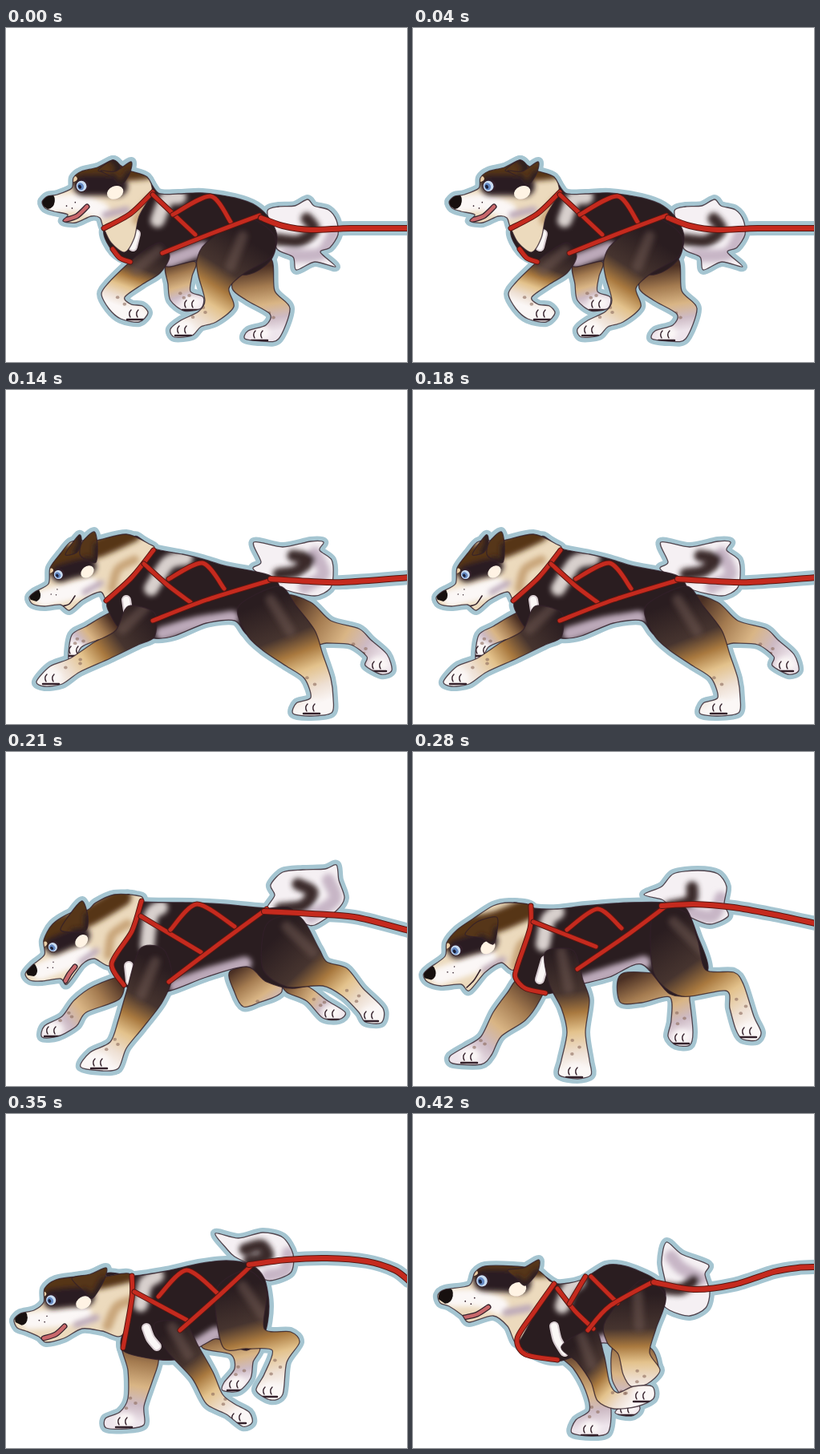
Write an HTML page that moves like this. It is 500x417 px and loops after 490 ms.

```html
<!DOCTYPE html>
<html lang="en">
<head>
<meta charset="utf-8">
<title>Running sled dog</title>
<style>
  html, body { margin: 0; width: 100%; height: 100%; overflow: hidden; background: #fff; }
  #stage { width: 500px; height: 417px; overflow: hidden; }
  #strip { animation: run 490ms steps(7) infinite; will-change: transform; }
  #strip svg { display: block; width: 500px; height: 417px; overflow: hidden; }
  path { stroke-linecap: round; stroke-linejoin: round; }
  @keyframes run { to { transform: translateY(-100%); } }
</style>
</head>
<body>
<div id="stage"><div id="strip"></div></div>
<script>
const INK = '#33202a', DARK = '#2a1d20', BROWN = '#563619', CREAM = '#ecdabd',
      LILAC = '#bca9b9', WHITE = '#fbf7f6', HALO = '#a5c5d1', RED = '#c52a1e';
let ids = 0;

const points = s => s.split(' ').map(p => p.split(',').map(Number));

// Softly rounded curve through the points
function curve(s, closed) {
  const p = points(s), n = p.length;
  const at = i => closed ? p[(i + n) % n] : p[Math.max(0, Math.min(n - 1, i))];
  let d = 'M' + p[0];
  for (let i = 0; i < (closed ? n : n - 1); i++) {
    const [a, b, c, e] = [at(i - 1), at(i), at(i + 1), at(i + 2)];
    const h = k => b[k] + (c[k] - a[k]) / 7, g = k => c[k] - (e[k] - b[k]) / 7;
    d += `C${h(0)} ${h(1)} ${g(0)} ${g(1)} ${c}`;
  }
  return closed ? d + 'Z' : d;
}

const line = (s, color, w) =>
  `<path d="${curve(s)}" fill="none" stroke="${color}" stroke-width="${w}"/>`;
const oval = (x, y, rx, ry, color) =>
  `<ellipse cx="${x}" cy="${y}" rx="${rx}" ry="${ry}" fill="${color}"/>`;
const blur = inner => `<g filter="url(#soft)">${inner}</g>`;
const strap = (s, w = 7) => line(s, '#571712', w) + line(s, RED, w - 2);

// Filled outline with shading clipped inside it
function part(s, fill, inner = '') {
  const d = curve(s, true), id = 'c' + ids++;
  return `<clipPath id="${id}"><path d="${d}"/></clipPath><path d="${d}" fill="${fill}"/>
    <g clip-path="url(#${id})">${inner}</g>
    <path d="${d}" fill="none" stroke="${INK}" stroke-width="1.3" stroke-opacity=".8"/>`;
}

// The axis runs hip, knee, paw
function leg([shape, axis], near) {
  const [hip, knee, paw] = points(axis), id = 'g' + ids++;
  const [x, y] = paw;
  const tones = near
    ? [[0, DARK], [.34, '#46342f'], [.52, '#a9793f'], [.68, '#e3c28c'], [.86, '#eee0d4'], [1, WHITE]]
    : [[0, '#4b3024'], [.3, '#a47b50'], [.58, '#d9b585'], [.8, '#cdbac4'], [1, '#eee5ec']];
  const stops = tones.map(([o, c]) => `<stop offset="${o}" stop-color="${c}"/>`).join('');
  const spots = [.35, .5, .65].map((t, i) => oval(
    knee[0] + (x - knee[0]) * t + (i % 2 ? 5 : -4),
    knee[1] + (y - knee[1]) * t, 2.3, 2, '#8d6c5c99')).join('');
  const mid = [(hip[0] + knee[0]) / 2, (hip[1] + knee[1]) / 2];
  const sheen = near ? blur(line(`${hip} ${mid}`, '#6f574f88', 13)) : '';
  const toes = `<path d="M${x - 6} ${y - 3}q-4 4-1 9M${x + 3} ${y - 3}q-4 4-1 9"
    fill="none" stroke="${INK}" stroke-width="1.4"/>`;
  return `<linearGradient id="${id}" gradientUnits="userSpaceOnUse" x1="${hip[0]}" y1="${hip[1]}"
    x2="${x}" y2="${y}">${stops}</linearGradient>` +
    part(shape, `url(#${id})`, sheen + blur(oval(x, y, 12, 9, WHITE)) + spots + toes +
      line(`${x - 11},${y + 9} ${x + 9},${y + 9}`, INK, 2.5));
}

// Face details, in units where the nose is at 0,0 and the eye at 50,0
function head(p) {
  const [[nx, ny], [ex, ey]] = points(p.face);
  const a = (ex - nx) / 50, b = (ey - ny) / 50;
  const place = s => `<g transform="matrix(${a} ${b} ${-b} ${a} ${nx} ${ny})">${s}</g>`;
  const coat = blur(place(
    line('95,62 118,46 145,50', '#c9a67a', 12) + line('62,42 88,46', LILAC, 8) +
    line('46,-19 72,-16 112,4 165,18', BROWN, 27) +
    line('52,0 72,8 88,16', DARK, 25)));
  const marks = place(
    oval(83, 22, 10, 7.5, '#fff3e4') + oval(44, -11, 4, 3, '#e9cda6') +
    oval(50, 0, 8, 7.5, INK) + oval(49, 0, 6, 6.3, '#c9dcf2') +
    oval(48, 0, 3.7, 4.5, '#6488c2') + oval(47, 0, 1.8, 2.4, '#1b2038') +
    [24, 29, 35].map((x, i) => oval(x, 15 + i % 2 * 5, .8, .8, INK)).join('') +
    `<path d="M-3 3Q-1-7 11-6Q17-3 13 5Q9 12 2 10Z" fill="#17100f"/>`);
  const mouth = p.open
    ? line(p.mouth, INK, 7) + line(p.mouth, '#c9686b', 4.5)
    : line(p.mouth, INK, 1.6);
  return part(p.head, CREAM, blur(line(p.muzzle, WHITE, 22)) + coat + marks + mouth) +
    p.ears.map(e => part(e, BROWN, blur(line(e.split(' ').slice(-3).join(' '), DARK, 9)))).join('');
}

function dog(p) {
  const shapes = [p.tail, p.body, p.head, ...p.ears, ...p.far.map(l => l[0]), ...p.near.map(l => l[0])];
  const halo = shapes.map(s =>
    `<path d="${curve(s, true)}" fill="${HALO}" stroke="${HALO}" stroke-width="12"/>`).join('');
  const coat = blur(line(p.streak, '#d8d0cd', 18) + line(p.belly, LILAC, 17)) +
    line(p.chest, '#d9cdd2', 12) + line(p.chest, WHITE, 8);
  return '<svg viewBox="0 0 500 417">' + halo + line(p.tug, HALO, 18) +
    part(p.tail, '#f5f0f3', blur(line(p.shade, '#c7b6c6', 16) + line(p.ring, '#3a292b', 15))) +
    p.far.map(l => leg(l, false)).join('') + part(p.body, DARK, coat) +
    p.near.map(l => leg(l, true)).join('') + head(p) +
    p.straps.map(s => strap(s)).join('') + strap(p.tug, 8) + '</svg>';
}

const poses = [
  {
    face: '46,217 95,197', open: 1, mouth: '72,240 88,235 101,223', muzzle: '58,220 90,218 118,228',
    head: '45,217 52,210 64,208 82,200 84,187 94,179 114,174 133,165 142,171 154,178 176,186 182,205 166,235 160,262 148,280 131,268 121,248 117,237 106,235 87,243 71,241 77,233 60,229 49,225',
    ears: ['115,178 133,165 142,172 138,180', '118,178 136,179 156,167 154,182 143,196 132,186'],
    body: '172,186 190,206 215,207 245,206 285,212 312,222 330,240 338,262 330,290 300,308 250,300 236,291 205,298 190,296 158,293 134,280 122,252 150,225',
    streak: '216,211 200,214 189,240', chest: '162,257 158,273', belly: '203,291 245,275',
    tail: '326,228 340,223 360,222 376,214 384,222 402,227 412,240 414,258 404,274 392,280 411,298 385,292 362,302 358,286 338,276 330,250',
    shade: '350,284 392,282 409,256', ring: '338,264 365,266 384,252 375,238',
    far: [['290,300 282,325 300,340 329,357 324,371 302,378 298,388 320,391 340,388 354,350 335,328 330,288', '305,300 340,342 317,381'],
          ['200,295 202,320 205,340 222,353 243,350 246,336 230,329 232,310 236,292', '215,290 216,325 231,343']],
    near: [['250,268 300,238 334,258 331,285 296,307 278,325 284,348 262,367 243,373 232,384 210,386 205,376 218,365 240,354 248,340 240,310 238,290', '295,260 265,335 222,375'],
           ['166,282 148,298 128,318 119,332 128,350 143,363 166,367 177,356 170,347 156,345 148,336 170,320 192,306 204,285 192,268', '190,278 133,326 162,355']],
    straps: ['183,205 155,232 122,250', '183,208 236,258', '208,233 255,210 280,242', '195,281 255,257 316,234', '133,276 142,287 155,292'],
    tug: '318,237 345,247 380,252 430,250 502,250'
  },
  {
    face: '40,237 81,211', open: 1, mouth: '73,256 87,250 97,238', muzzle: '54,240 82,236 110,239',
    head: '38,238 45,231 62,225 70,214 68,200 78,181 95,171 110,176 132,180 160,183 172,195 184,206 155,235 127,259 118,246 105,246 93,256 73,257 75,250 55,249 42,246',
    ears: ['76,187 92,172 109,173 100,184', '95,182 118,178 135,164 137,175 130,192 118,192'],
    body: '160,184 183,205 205,210 230,221 270,225 318,240 335,262 338,290 325,310 290,325 268,300 255,297 210,298 180,292 150,292 132,277 127,258 150,232',
    streak: '208,214 194,220 180,245', chest: '157,257 149,267', belly: '185,297 258,290',
    tail: '316,238 327,230 311,211 345,218 375,213 397,219 391,226 404,244 400,260 405,272 375,274 400,283 360,278 340,268 328,252',
    shade: '345,266 382,270 401,252', ring: '338,244 362,252 379,240 366,230',
    far: [['332,272 352,280 372,302 390,318 408,340 422,362 418,385 405,398 384,397 380,389 400,374 385,349 360,338 332,328', '335,285 396,340 397,386'],
          ['150,296 148,325 142,345 160,352 185,356 201,349 192,340 169,338 172,320 178,298', '163,292 158,338 184,345']],
    near: [['275,250 318,240 335,262 335,300 322,325 341,350 335,375 315,400 290,410 265,408 271,395 298,388 310,370 306,352 280,330 268,305', '312,258 322,355 288,398'],
           ['155,276 120,290 98,297 87,308 89,328 80,344 86,354 104,356 110,342 106,322 114,313 150,304 176,300 182,280', '176,280 99,304 96,346']],
    straps: ['184,207 158,236 125,260', '185,210 203,241 222,268', '205,234 246,224 262,252', '177,289 230,266 318,240'],
    tug: '315,240 360,247 410,252 455,248 502,240'
  },
  {
    face: '31,258 66,230', open: 0, mouth: '70,270 79,267 86,257', muzzle: '48,260 75,253 105,245',
    head: '29,259 36,252 53,242 55,222 68,204 80,190 93,188 112,188 150,180 178,192 184,200 155,232 128,263 118,252 95,262 79,275 68,268 48,270 33,267',
    ears: ['74,205 91,181 94,190 88,203', '92,205 95,190 110,177 114,195 112,215 100,212'],
    body: '160,183 185,198 220,205 245,211 275,220 330,232 345,255 358,290 330,320 300,305 285,288 250,291 210,307 185,310 145,300 130,280 127,262 155,225',
    streak: '224,210 202,216 181,248', chest: '150,262 153,282', belly: '195,304 235,292 282,284',
    tail: '328,238 308,223 318,215 309,190 345,196 380,189 396,190 391,200 406,212 408,232 404,248 385,257 350,250',
    shade: '385,204 396,230 372,246', ring: '340,230 362,226 378,212 358,207',
    far: [['348,258 380,265 405,288 440,298 455,312 475,330 481,350 468,355 448,344 450,333 430,318 400,316 375,316', '355,272 422,304 465,342'],
          ['135,277 100,295 82,306 78,335 86,336 94,321 112,313 140,304', '132,288 96,304 87,323']],
    near: [['290,270 340,245 362,270 385,300 395,330 405,360 408,385 406,403 380,407 358,404 362,391 380,384 372,360 350,345 320,325 300,305', '330,262 378,340 382,395'],
           ['152,270 137,300 110,315 80,335 55,345 38,364 48,370 70,367 92,352 130,335 165,318 185,308 185,278', '173,272 118,325 57,358']],
    straps: ['184,200 157,234 125,263', '172,217 202,244 230,265', '203,236 245,216 272,248', '183,288 250,262 335,236'],
    tug: '330,236 380,239 420,240 502,234'
  },
  {
    face: '27,275 59,243', open: 1, mouth: '74,286 79,277 86,268', muzzle: '43,274 68,264 98,253',
    head: '24,277 33,266 48,253 47,235 58,215 80,201 102,197 112,188 135,178 162,179 171,186 155,225 132,266 110,258 95,265 76,290 68,283 45,286 30,285',
    ears: ['68,222 80,202 95,186 102,205 100,222 85,225'],
    body: '150,179 172,187 230,188 270,190 325,195 355,195 372,220 388,255 400,280 360,295 325,287 300,268 250,281 205,298 170,302 148,291 131,265 150,225',
    streak: '193,194 181,204 176,242', chest: '153,267 155,286', belly: '212,292 250,278 298,264',
    tail: '325,197 335,179 330,166 345,150 370,147 398,146 412,141 415,160 422,182 412,198 385,216 370,213 350,200',
    shade: '402,160 410,184 380,206', ring: '342,196 370,192 382,175 364,165',
    far: [['345,288 375,292 400,310 423,325 415,334 395,332 375,311 350,300', '345,285 378,300 406,325'],
          ['280,273 285,300 296,318 315,313 344,299 330,268', '300,262 303,304 345,325'],
          ['145,281 110,292 85,310 70,330 48,342 45,356 65,355 88,342 100,325 142,308', '142,286 95,315 59,346']],
    near: [['325,215 365,205 390,245 400,262 425,270 445,295 470,320 468,338 448,337 440,325 420,305 395,292 350,293 320,270', '350,218 415,282 455,327'],
           ['167,246 150,300 140,335 130,362 105,375 93,393 120,398 140,395 150,370 170,345 195,312 207,280 196,246', '186,262 152,344 117,386']],
    straps: ['169,186 157,224 132,264 147,291', '168,205 243,250', '205,222 238,190 285,218', '203,287 265,240 325,196'],
    tug: '322,199 400,203 440,207 502,223'
  },
  {
    face: '15,278 54,247', open: 0, mouth: '67,294 76,285 84,272', muzzle: '33,280 62,270 94,258',
    head: '13,278 20,270 40,255 42,238 55,222 75,208 100,192 120,188 146,191 150,205 128,270 110,263 90,275 70,298 60,290 35,292 18,287',
    ears: ['65,228 80,212 104,206 105,222 100,240 85,232'],
    body: '125,189 150,195 180,196 215,192 270,188 315,188 340,195 355,230 368,270 350,300 320,302 285,265 245,281 205,291 165,302 132,287 128,265 145,225',
    streak: '180,200 168,210 162,240', chest: '165,260 158,284', belly: '210,288 245,276 288,263',
    tail: '318,190 310,184 288,178 310,168 325,152 355,148 380,152 391,168 388,190 393,205 370,215 345,206',
    shade: '384,182 374,205 348,201', ring: '320,193 346,186 348,169',
    far: [['262,276 258,312 285,313 320,306 322,335 318,355 328,366 345,366 349,350 345,310 340,283', '295,268 332,310 335,355'],
          ['132,283 118,300 100,325 85,355 65,368 46,380 50,389 85,390 98,378 110,355 140,335 158,310 162,293', '150,288 98,350 71,379']],
    near: [['300,200 340,200 355,235 365,272 400,275 412,290 425,330 434,350 428,360 410,358 402,345 395,320 390,298 335,305 300,275', '325,212 401,288 419,347'],
           ['165,250 170,290 185,320 192,350 185,385 182,403 205,408 222,403 220,385 215,350 220,310 212,285 200,248', '185,250 203,340 202,397']],
    straps: ['147,192 146,220 130,268 128,282 140,295 165,301', '150,212 228,243', '192,222 230,196 260,220', '205,271 265,230 316,192'],
    tug: '310,192 350,190 400,194 450,203 502,214'
  },
  {
    face: '13,256 57,232', open: 1, mouth: '47,280 62,275 73,265', muzzle: '30,258 62,255 96,250',
    head: '10,257 18,249 35,245 47,235 48,218 62,207 90,203 122,203 155,200 156,230 145,276 120,271 95,268 72,280 50,285 41,278 25,271 14,267',
    ears: ['82,205 105,200 125,192 122,208 108,230 98,222'],
    body: '125,200 160,202 200,196 240,187 275,183 305,188 322,205 328,240 322,275 300,295 265,281 250,286 215,306 185,306 150,298 143,285 152,240',
    streak: '188,202 174,212 168,238', chest: '175,267 180,280 188,290', belly: '222,300 262,274',
    tail: '307,190 285,178 275,168 261,149 290,155 320,148 345,154 358,175 355,198 330,208 315,202',
    shade: '352,174 348,196 326,202', ring: '303,184 326,178 318,164 298,169',
    far: [['250,268 245,292 280,300 285,318 272,335 270,345 290,346 305,330 308,310 314,288', '270,265 297,305 287,336'],
          ['145,285 152,320 152,355 142,372 124,380 125,392 150,393 172,388 172,365 182,335 190,310 187,288', '165,278 165,340 148,382']],
    near: [['262,220 300,195 325,220 322,268 355,272 366,285 350,310 345,350 330,357 312,345 322,325 332,295 300,293 270,290', '295,215 345,288 329,344'],
           ['185,262 200,295 232,330 250,362 275,375 295,390 307,385 303,372 285,362 270,350 258,322 240,290 222,260', '207,266 247,335 290,377']],
    straps: ['157,202 157,230 146,292', '160,222 225,257', '190,228 225,195 265,225', '217,270 262,230 305,190'],
    tug: '303,188 350,182 400,180 450,184 485,195 502,208'
  },
  {
    face: '34,227 87,208', open: 1, mouth: '64,254 80,250 94,241', muzzle: '50,230 82,230 108,240',
    head: '31,226 40,219 70,214 77,198 90,190 125,190 154,194 170,208 177,215 152,250 130,286 118,265 100,252 70,260 61,251 45,240 34,236',
    ears: ['118,195 138,192 157,182 155,198 140,214 130,206'],
    body: '158,202 180,212 210,207 240,189 265,190 300,205 315,225 300,265 265,287 235,286 215,296 185,308 160,305 130,285 150,245',
    streak: '206,209 194,219 186,240', chest: '176,265 180,282 189,297', belly: '225,289 243,282',
    tail: '300,208 315,215 310,185 316,160 335,175 368,188 364,200 370,222 365,242 345,252 320,245 305,230',
    shade: '322,178 334,192 360,206', ring: '309,217 334,219 350,208',
    far: [['252,285 248,330 262,358 252,373 272,377 283,368 276,346 290,336 306,322 296,292', '275,270 262,335 267,367'],
          ['182,300 200,318 215,345 220,370 203,382 198,398 222,402 243,398 247,370 240,345 232,315', '205,292 230,352 221,392']],
    near: [['240,258 285,207 315,228 303,268 295,298 308,320 292,337 272,340 262,325 256,300 242,285', '280,225 284,305 283,350'],
           ['185,290 205,310 222,335 230,358 250,368 280,365 300,355 298,340 275,340 255,348 245,335 238,300 225,268', '210,278 235,347 286,350']],
    straps: ['176,212 152,246 130,280 140,300 180,307', '180,218 202,246 225,268', '195,237 215,203', '222,203 255,236', '218,270 245,240 300,209'],
    tug: '300,210 350,219 400,213 450,197 480,192 502,191'
  }
];

const defs = `<filter id="soft" filterUnits="userSpaceOnUse" x="0" y="0" width="500" height="417">
  <feGaussianBlur stdDeviation="3"/></filter>`;
document.getElementById('strip').innerHTML =
  poses.map(dog).join('').replace('>', '>' + defs);
</script>
</body>
</html>
```
